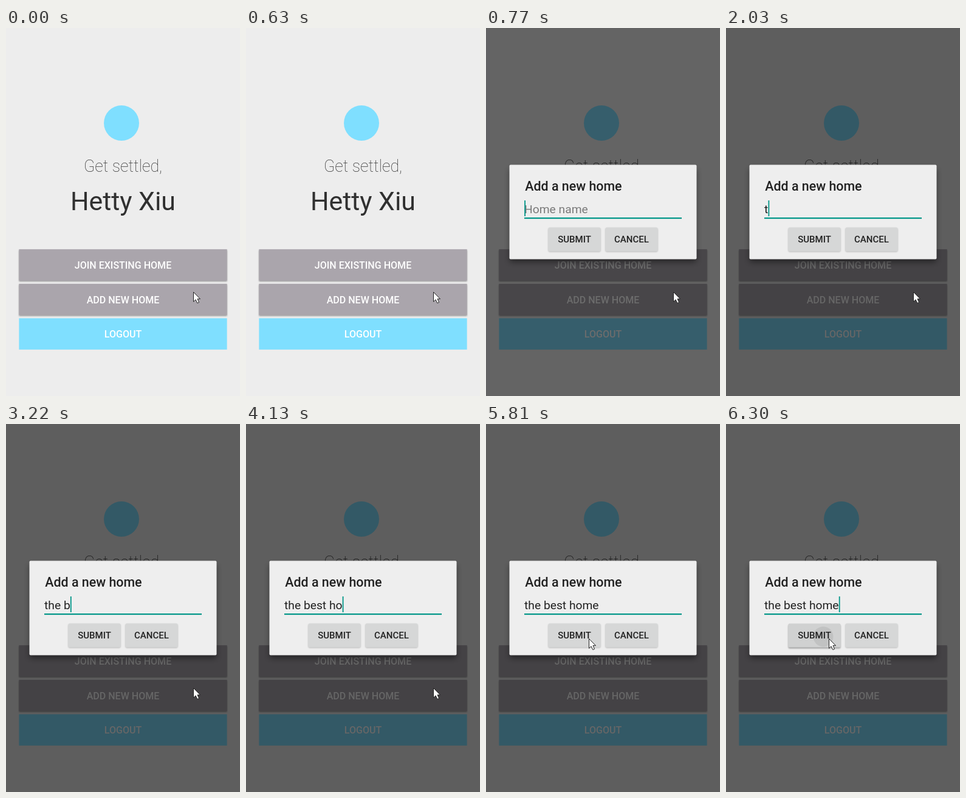
Write an HTML page that moves like this. It is 385 px wide and 604 px high and loops after 6370 ms.

```html
<!DOCTYPE html>
<html lang="en">
<head>
<meta charset="utf-8">
<title>Add a new home</title>
<style>
html, body { margin: 0; width: 100%; height: 100%; overflow: hidden; background: #ededed; }
svg { display: block; width: 385px; height: 604px; font-family: Roboto, sans-serif; }
.mid { text-anchor: middle; }
.big { font-size: 16.05px; font-weight: 500; fill: #fff; }
.small { font-size: 15px; font-weight: 500; fill: #212121; }
#field { font-size: 19.25px; white-space: pre; }
</style>
</head>
<body>
<svg viewBox="0 0 385 604">
  <defs>
    <filter id="soft" x="-20%" y="-20%" width="140%" height="150%"><feGaussianBlur stdDeviation="5"/></filter>
    <filter id="thin" x="-10%" y="-20%" width="120%" height="150%"><feGaussianBlur stdDeviation=".8"/></filter>
    <clipPath id="submitClip"><rect x="102.5" y="327.5" width="86" height="39" rx="2"/></clipPath>
  </defs>

  <rect width="385" height="604" fill="#ededed"/>
  <circle cx="190" cy="156" r="29" fill="#7fdfff"/>
  <text class="mid" x="192.5" y="235.8" font-size="26.75" font-weight="100" fill="#303030">Get settled,</text>
  <text class="mid" x="192.5" y="299" font-size="42.8" fill="#303030">Hetty Xiu</text>
  <g id="menu"></g>
  <rect id="dim" width="385" height="604"/>

  <g id="dialog">
    <rect x="39" y="231" width="307" height="153" rx="3" opacity=".45" filter="url(#soft)"/>
    <rect x="38.5" y="224.5" width="308" height="155" rx="2" fill="#eee"/>
    <text x="64.2" y="266.8" font-size="21.4" font-weight="500" fill="#212121">Add a new home</text>
    <text id="field" x="63" y="304"></text>
    <rect x="63" y="311" width="259" height="2.2" fill="#009688"/>
    <rect id="caret" y="283" width="1.8" height="26" fill="#009688"/>
    <rect id="lift" x="102.5" y="328.5" width="86" height="39" rx="2" filter="url(#thin)"/>
    <rect x="196.5" y="328.5" width="86" height="39" rx="2" opacity=".22" filter="url(#thin)"/>
    <rect id="submit" x="102.5" y="327.5" width="86" height="39" rx="2"/>
    <rect x="196.5" y="327.5" width="86" height="39" rx="2" fill="#d6d7d7"/>
    <circle id="ripple" cx="160" cy="349" clip-path="url(#submitClip)" opacity=".07"/>
    <text class="mid small" x="145.5" y="352.2">SUBMIT</text>
    <text class="mid small" x="239.5" y="352.2">CANCEL</text>
  </g>

  <path id="mouse" d="M.5 .5V16.2L4 12.8L6.8 18.5L9.6 17.3L7 11.7H11.5Z" fill="#fff" stroke="#222" stroke-linejoin="round"/>
</svg>
<script>
const LOOP = 6370, TICK = 70, BLINK = 490;
const PHRASE = 'the best home';
const $ = id => document.getElementById(id);

$('menu').innerHTML = ['JOIN EXISTING HOME', 'ADD NEW HOME', 'LOGOUT'].map((label, i, all) => {
  const y = 363.2 + i * 56.6, flat = i === all.length - 1;
  const box = (top, style) => `<rect x="21.4" y="${top}" width="342.2" height="51.4" ${style}/>`;
  return (flat ? '' : box(y + 1.5, 'opacity=".35" filter="url(#thin)"')) +
    box(y, `fill="${flat ? '#7fdfff' : '#aaa5ac'}"`) +
    `<text class="mid big" x="192.5" y="${y + 32}">${label}</text>`;
}).join('');

const progress = (t, from, length) => Math.max(0, Math.min(1, (t - from) / length));
const smooth = p => p * p * (3 - 2 * p);
const easeOut = p => 1 - (1 - p) ** 3;
const mix = (a, b, p) => a + (b - a) * p;
const set = (id, attrs) => {
  for (const k in attrs) $(id).setAttribute(k, attrs[k]);
};

// The first word is typed slowly; the rest follows a pause at a quicker pace.
const keyTime = i => i < 3 ? 1960 + 210 * i : Math.min(3010 + 160 * (i - 3), 4340);
const keys = [...PHRASE].map((_, i) => keyTime(i));

const pen = document.createElement('canvas').getContext('2d');
pen.font = '19.25px Roboto, sans-serif';

function draw(t) {
  const open = progress(t, 642, 145);
  set('dim', { opacity: .6 * smooth(open) });
  set('dialog', { opacity: easeOut(open) });

  const pressed = keys.filter(k => k <= t);
  const text = PHRASE.slice(0, pressed.length);
  const idle = t - (pressed.at(-1) ?? 560);
  $('field').textContent = text || 'Home name';
  set('field', { fill: text ? '#212121' : '#7a7a7a' });
  set('caret', {
    x: 63.2 + pen.measureText(text).width,
    opacity: idle % (2 * BLINK) < BLINK ? 1 : 0
  });

  const press = progress(t, 5950, 350);
  set('submit', { fill: press ? '#d0d1d1' : '#d6d7d7' });
  set('lift', { y: 328.5 + press, opacity: mix(.22, .32, press) });
  set('ripple', { r: press * 16.5 });

  const move = easeOut(progress(t, 4900, 490));
  const x = Math.round(mix(308, 169, move)), y = Math.round(mix(433, 352, move));
  set('mouse', { transform: `translate(${x} ${y})` });
}

const start = performance.now();
function frame() {
  const t = (performance.now() - start) % LOOP;
  draw(Math.floor(t / TICK) * TICK);
  requestAnimationFrame(frame);
}
frame();
</script>
</body>
</html>
```
